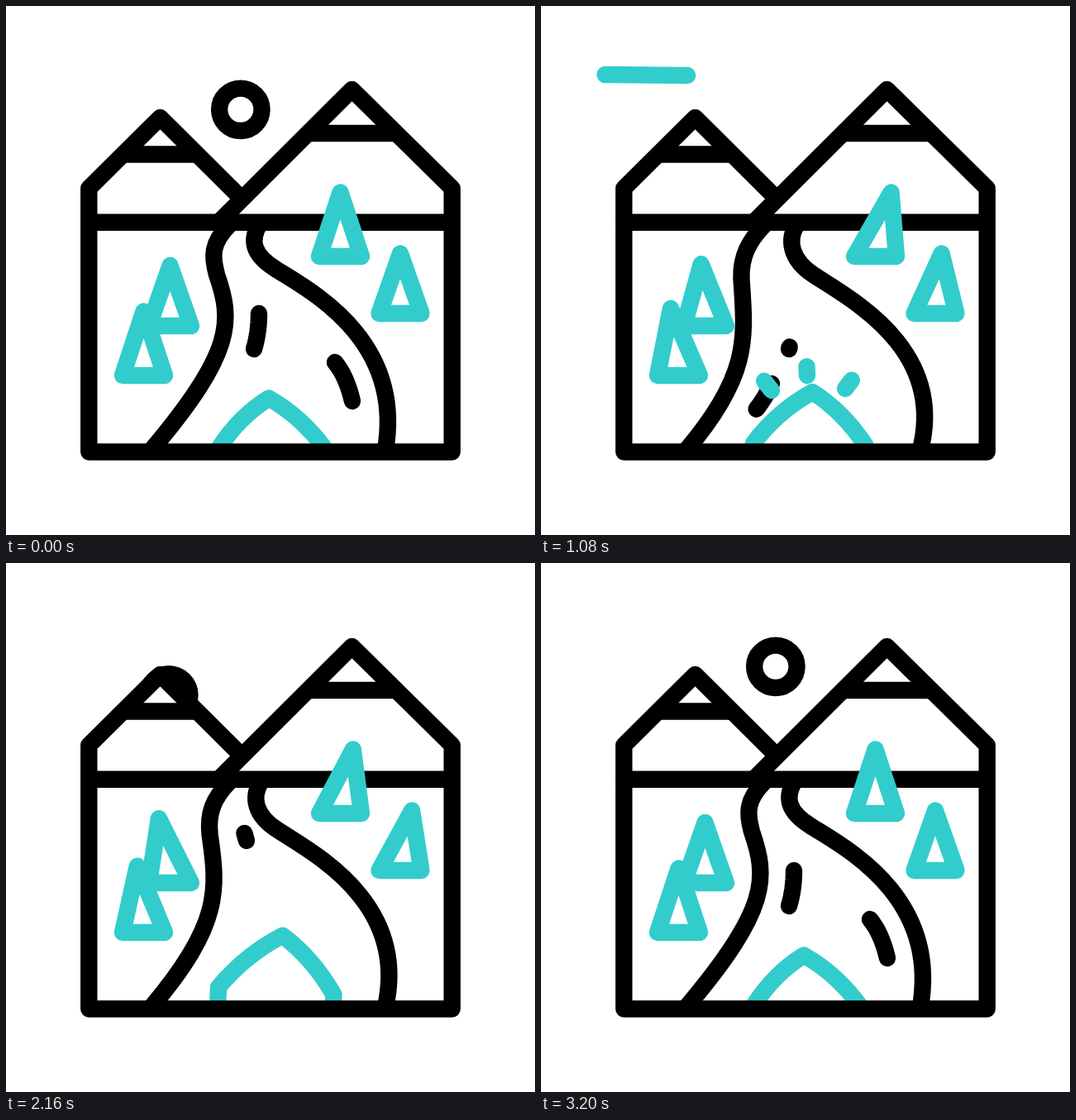
Recreate the animation shown at these times as an HTML page with a canvas. Size 640 by 640 pixels, loop 3300 ms.

```html
<!DOCTYPE html>
<html lang="en">
<head>
<meta charset="utf-8">
<title>Valley road</title>
<style>
html, body { margin: 0; width: 100%; height: 100%; overflow: hidden; background: #fff; }
canvas { display: block; width: 640px; height: 640px; }
</style>
</head>
<body>
<canvas id="stage" width="640" height="640"></canvas>
<script>
const ctx = document.getElementById('stage').getContext('2d');
const LOOP = 3300, END = 3200, STEP = 20, FLOW = 490;
const INK = '#000', TEAL = '#33cccc';

const ramp = (t, a, b) => Math.max(0, Math.min(1, (t - a) / (b - a)));
const ease = u => u * u * (3 - 2 * u);
// 0 at start, 1 at peak, back to 0 at end
const swing = (t, start, peak, end) => ease(ramp(t, start, peak)) * (1 - ease(ramp(t, peak, end)));

function stroke(color, cap = 'butt') {
  ctx.strokeStyle = color;
  ctx.lineCap = cap;
  ctx.stroke();
}

function poly(...pts) {
  ctx.beginPath();
  for (let i = 0; i < pts.length; i += 2) ctx.lineTo(pts[i], pts[i + 1]);
}

function line(...pts) {
  poly(...pts);
  stroke(INK);
}

// A bent dash that grows from its first end, then shrinks into its last
function dash(t, color, [x0, y0, x1, y1], [bendX, bendY], appear, leave, fade = FLOW) {
  if (t < appear) t += LOOP;
  const head = ramp(t, appear, appear + FLOW), tail = ramp(t, leave, leave + fade);
  if (head <= tail) return;
  const pts = [];
  for (let i = 0; i <= 8; i++) {
    const u = tail + (head - tail) * i / 8, b = 2 * u * (1 - u);
    pts.push(x0 + (x1 - x0) * u + b * bendX, y0 + (y1 - y0) * u + b * bendY);
  }
  poly(...pts);
  stroke(color, 'round');
}

function drawSun(t) {
  const turn = t < END / 2 ? 27.8 * (t / 840) ** 2.6 : -36.4 * ((END - t) / 1040) ** 2.36;
  const a = (turn - 3.5) * Math.PI / 180;
  ctx.beginPath();
  ctx.arc(293 + 150 * Math.sin(a), 275 - 150 * Math.cos(a), 25.7, 0, 7);
  stroke(INK);
}

function roadEdge(x, y, ...curves) {
  ctx.beginPath();
  ctx.moveTo(x, y);
  ctx.bezierCurveTo(...curves.slice(0, 6));
  ctx.bezierCurveTo(...curves.slice(6));
  stroke(INK);
}

function drawRoad(t) {
  const m = swing(t, 150, 1400, 3060);
  roadEdge(270, 265,
    248 + 5 * m, 287 - 4 * m, 249 - 9 * m, 303 - m, 255 - 15 * m, 325 + 6 * m,
    274 - 32 * m, 380 + 25 * m, 277 - 28 * m, 418 + 33 * m, 176, 537);
  roadEdge(306 + 4 * m, 265,
    296 + 2 * m, 283, 297 + 6 * m, 300 + 9 * m, 326 + 5 * m, 318 + 9 * m,
    365 + 7 * m, 343 + 12 * m, 482 + 10 * m, 402 + 13 * m, 459, 537);

  dash(t, INK, [279, 457, 250, 500], [4, 2], 740, 1290);
  dash(t, INK, [281, 309, 291, 336], [1, -2], 1310, 1820);
  dash(t, INK, [306, 372, 300, 415], [3, 1.5], 2400, LOOP + 620);
  dash(t, INK, [398, 431, 419, 478], [3.5, -6.5], 2640, LOOP + 355);
}

function drawHill(t) {
  const lift = swing(t, 0, 640, 1340) + swing(t, 1500, 2200, 3050);
  const sway = swing(t, 0, 850, 1340) + swing(t, 1500, 2350, END);
  const x = 318 + 19 * sway, y = 474.5 - 24 * lift;
  const leftX = 257, leftY = 536 - 23 * lift;
  const rightX = 386 + 12 * sway, rightY = 536 - 14 * lift;
  ctx.beginPath();
  ctx.moveTo(256, 541);
  ctx.lineTo(leftX, leftY);
  ctx.quadraticCurveTo((x + leftX) / 2 - 6, (y + leftY) / 2 - 8, x, y);
  ctx.quadraticCurveTo((x + rightX) / 2 + 6, (y + rightY) / 2 - 8, rightX, rightY);
  ctx.lineTo(rightX - 1, 541);
  stroke(TEAL);

  for (const ray of [[279, 465, 260, 441], [322, 447, 321, 424], [368, 463, 385, 441]])
    dash(t, TEAL, ray, [0, 0], 850, 1360);
}

// The tip leans while the base stays put
function tree(x, base, height, lean) {
  poly(x + lean, base - height + .36 * Math.min(0, lean), x + 25.5, base, x - 25.5, base);
  ctx.closePath();
  ctx.fill();
  stroke(TEAL);
}

function drawTrees(t) {
  const early = swing(t, 260, 1575, 2825);
  tree(404.5, 303, 77.5, 28 * early);
  tree(477, 372, 72.5, 17.5 * swing(t, 520, 1750, END));
  tree(198.5, 387, 73, -17 * swing(t, 665, 1850, 2935));
  tree(166.5, 447, 77.5, -14 * early);
}

function draw(t) {
  ctx.fillStyle = '#fff';
  ctx.fillRect(0, 0, 640, 640);
  ctx.lineWidth = 20.4;
  ctx.lineJoin = 'round';

  // The land hides the sun below the ridges
  drawSun(t);
  poly(100, 540, 100, 220, 186.5, 135, 285, 233, 418.5, 101, 539.5, 221, 539.5, 540);
  ctx.fill();

  drawRoad(t);
  drawHill(t);

  line(284, 232, 186.5, 135, 100.3, 220.5, 100.3, 539.5, 539.7, 539.5, 539.7, 220.5, 418.5, 101, 258, 261);
  line(100, 261.7, 540, 261.7);
  line(145, 179.5, 229, 179.5);
  line(366, 154, 471, 154);

  drawTrees(t);
  dash(t, TEAL, [77.5, 83, 222, 84.5], [0, 0], 742, 1160, 210);
  dash(t, TEAL, [257, 46, 400, 49], [0, 0], 1208, 1620, 210);
}

function frame() {
  const t = performance.now() % LOOP;
  draw(t < 80 ? 0 : Math.min(END, t - t % STEP));
  requestAnimationFrame(frame);
}
frame();
</script>
</body>
</html>
```
